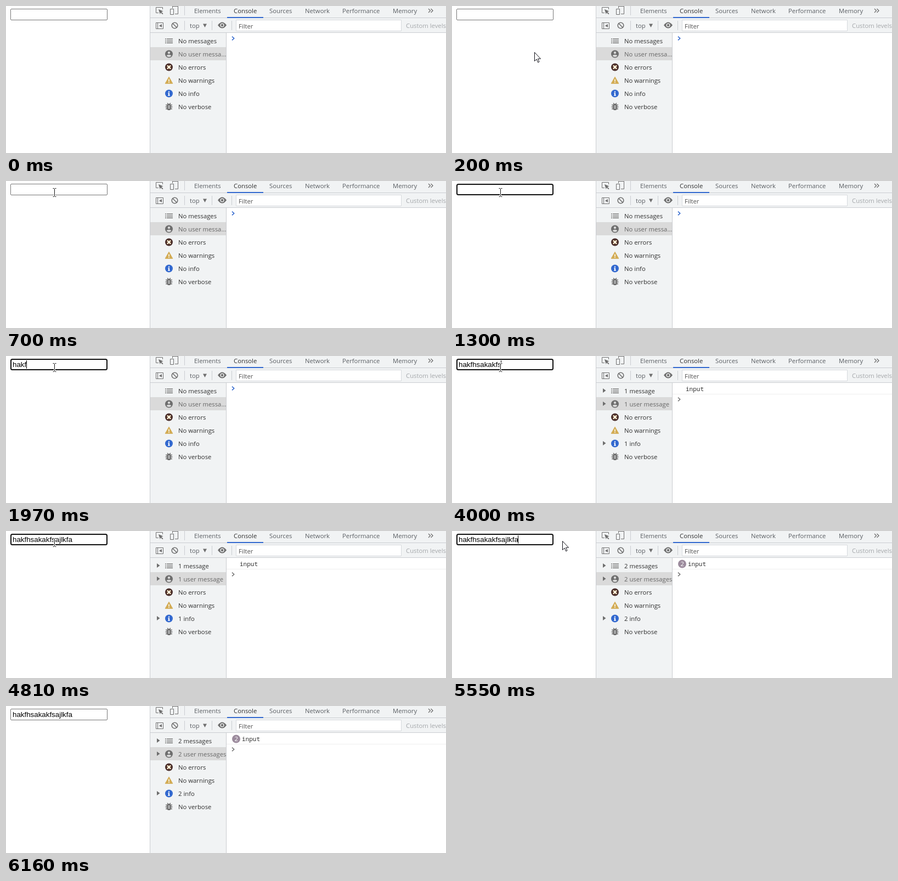
An HTML page with a canvas for the animation above (6230 ms loop, 802x268 px).

```html
<!DOCTYPE html>
<html lang="en">
<head>
<meta charset="utf-8">
<title>Debounced input</title>
<style>
  html, body { margin: 0; width: 100%; height: 100%; overflow: hidden; background: #fff; }
  canvas { display: block; }
</style>
</head>
<body>
<canvas id="stage" width="802" height="268"></canvas>
<script>
const ctx = document.getElementById('stage').getContext('2d');
const UI = '11.3px "Open Sans", "Noto Sans", sans-serif';
const MONO = '11px "Noto Sans Mono", "DejaVu Sans Mono", monospace';
const FIELD = '13.333px "Liberation Sans", Arial, sans-serif';
const BAR = '#f1f3f4', LINE = '#cacdd1', GREY = '#6e6e6e', INK = '#303030', BLUE = '#3369cf';

const LOOP = 6230, TICK = 66.6;
const FOCUS = 770, BLUR = 6160, BLINK = 495, WAIT = 990;
const BURSTS = [
  { keys: 'hakfhsak', start: 1700, end: 2180 },
  { keys: 'akfsajlkfa', start: 3810, end: 4280 }
];

const mix = (a, b, u) => a + (b - a) * u;
const easeOut = (u, power) => 1 - (1 - u) ** power;
const progress = (t, start, end) => Math.min(1, Math.max(0, (t - start) / (end - start)));

function typed(t) {
  return BURSTS.filter(b => t >= b.start).map(({ keys, start, end }) =>
    keys.slice(0, 1 + Math.floor(progress(t, start, end) * (keys.length - 1)))).join('');
}

// the blink restarts with each key
function caretOn(t) {
  let last = FOCUS;
  for (const b of BURSTS) if (t >= b.start) last = Math.min(t, b.end);
  return Math.floor((t - last) / BLINK) % 2 === 0;
}

// debounced: one message per pause in typing
const messages = t => BURSTS.filter(b => t >= b.end + WAIT).length;

function mouse(time) {
  const t = Math.floor(time / TICK) * TICK;
  if (t < 66 || t > 5850) return null;
  if (t < 5300) {
    const u = progress(t, 66, 630);
    return [mix(585, 88, easeOut(u, 7.7)), mix(258, 21, easeOut(u, 4.9))];
  }
  const u = progress(t, 5300, 5850);
  return [mix(88, 745, u * u), mix(21, 258, u * u) - 45 * Math.sin(Math.PI * u)];
}

function rect(x, y, w, h, color) {
  ctx.fillStyle = color;
  ctx.fillRect(x, y, w, h);
}

function label(str, x, y, color = INK, font = UI) {
  ctx.font = font;
  ctx.fillStyle = color;
  ctx.fillText(str, x, y);
  return ctx.measureText(str).width;
}

function disc(x, y, r, color) {
  ctx.fillStyle = color;
  ctx.beginPath();
  ctx.arc(x, y, r, 0, Math.PI * 2);
  ctx.fill();
}

function shape(d, x, y, fill, stroke, width = 1) {
  const path = new Path2D(d);
  ctx.save();
  ctx.translate(x, y);
  if (fill) { ctx.fillStyle = fill; ctx.fill(path); }
  if (stroke) { ctx.strokeStyle = stroke; ctx.lineWidth = width; ctx.stroke(path); }
  ctx.restore();
}

function frame(x, y, w, h, radius, width, color) {
  ctx.strokeStyle = color;
  ctx.lineWidth = width;
  ctx.beginPath();
  ctx.roundRect(x + width / 2, y + width / 2, w - width, h - width, radius);
  ctx.stroke();
}

function drawField(t) {
  const focus = t >= FOCUS && t < BLUR;
  frame(8, 5, 177, 21, focus ? 2.5 : 1.5, focus ? 2 : 1, focus ? '#101010' : '#767676');
  const width = label(typed(t), 12, 20, '#000', FIELD);
  if (focus && caretOn(t)) rect(12 + Math.floor(width), 8, 1, 15, '#000');
}

function drawTabs() {
  rect(263, 0, 539, 21, BAR);
  rect(263, 21, 539, 1, LINE);
  shape('M5 10.5H.5V.5H12.5V4', 273, 2, null, GREY);
  shape('M5 4L13.5 7.5L10.3 8.8L13.5 12L12.2 13.2L9 10L7.8 13Z', 273, 2, GREY);
  shape('M3.5 4V.5H13.5V14.5H8', 300, 0, null, GREY);
  shape('M.5 5.5H6.5V15.5H.5Z', 299, 0, BAR, GREY);
  rect(325, 0, 1, 17, LINE);
  let x = 343;
  for (const name of ['Elements', 'Console', 'Sources', 'Network', 'Performance', 'Memory']) {
    const active = name === 'Console';
    const left = Math.round(x);
    const width = label(name, left, 13, active ? INK : '#5a5e63');
    if (active) rect(left - 12, 20, Math.round(width) + 24, 2, BLUE);
    x += width + 23.2;
  }
  shape('M0 0L3.5 3.5L0 7M4.5 0L8 3.5L4.5 7', 770, 5, null, GREY, 1.3);
}

function drawToolbar() {
  rect(263, 22, 539, 26, BAR);
  rect(263, 48, 539, 1, LINE);
  shape('M.5 .5H13.5V11.5H.5ZM3.5 1V11', 273, 30, null, GREY);
  shape('M11 3V9L6 6Z', 273, 30, GREY);
  shape('M-5.3 0A5.3 5.3 0 1 1 5.3 0A5.3 5.3 0 1 1 -5.3 0M-3.7 -3.7L3.7 3.7', 307.5, 35.5, null, GREY, 1.6);
  for (const x of [325, 375, 411]) rect(x, 27, 1, 17, LINE);
  label('top', 335, 40, '#5a5e63');
  shape('M0 0H7L3.5 6.5Z', 359, 32.5, GREY);
  shape('M-8 0Q0 -11 8 0Q0 11 -8 0Z', 394, 35, GREY);
  disc(394, 35, 3.6, BAR);
  disc(394, 35, 2.2, GREY);
  rect(419, 25, 302, 21, '#fff');
  frame(419, 25, 302, 21, 0, 1, '#d6d9dc');
  label('Filter', 424, 41, '#505050');
  label('Custom levels', 729, 40, '#a5a8ab');
}

const ICONS = [
  y => {
    for (let i = -1; i < 2; i++) {
      const top = y - 0.5 + i * 3.5;
      rect(290, top, 2, 1.5, GREY);
      rect(293, top, 11, 1.5, GREY);
    }
  },
  y => {
    disc(297, y, 7, GREY);
    disc(297, y - 2.4, 2.2, '#dadada');
    shape('M-4.3 3.6Q-3.5 1.2 0 1.2Q3.5 1.2 4.3 3.6Q0 7.6 -4.3 3.6Z', 297, y, '#dadada');
  },
  y => {
    const cross = 'M-3 -3L3 3M3 -3L-3 3';
    disc(297, y, 7, '#4b302d');
    shape(cross, 297, y, null, '#d9b36c', 2.8);
    shape(cross, 297, y, null, '#fff', 1.7);
  },
  y => {
    shape('M0 -6.2L6.8 5.8H-6.8Z', 297, y, '#d3ac55', '#d3ac55');
    rect(296.2, y - 2, 1.6, 4, '#fff');
    rect(296.2, y + 3, 1.6, 1.6, '#fff');
  },
  y => {
    disc(297, y, 7, BLUE);
    rect(296, y - 4, 2, 2, '#fff');
    shape('M-2 -1H1V3H2V4.3H-2V3H-1V0H-2Z', 297, y, '#fff');
  },
  y => {
    shape('M-6 -3H6M-6.5 .5H6.5M-6 4H6M-3 -6.5L-1 -4.5M3 -6.5L1 -4.5', 297, y, null, GREY, 1.6);
    shape('M-4 -1Q-4 -5 0 -5Q4 -5 4 -1V2.5Q4 6.5 0 6.5Q-4 6.5 -4 2.5Z', 297, y, GREY);
    rect(295, y - 1.6, 4, 1.3, BAR);
    rect(295, y + 1.6, 4, 1.3, BAR);
  }
];

function drawSidebar(n) {
  rect(263, 49, 138, 219, BAR);
  rect(263, 75, 138, 24, '#dadada');
  const s = n === 1 ? '' : 's';
  const names = n
    ? [`${n} message${s}`, `${n} user message${s}`, 'No errors', 'No warnings', `${n} info`, 'No verbose']
    : ['No messages', 'No user messa...', 'No errors', 'No warnings', 'No info', 'No verbose'];
  ctx.save();
  ctx.beginPath();
  ctx.rect(263, 49, 138, 219);
  ctx.clip();
  names.forEach((name, i) => {
    const y = 63 + i * 24;
    ICONS[i](y + 0.5);
    label(name, 314, y + 5, i === 1 ? '#666' : INK);
    if (!name.startsWith('No')) shape('M0 -4L5.5 0L0 4Z', 275, y, GREY);
  });
  ctx.restore();
  rect(401, 49, 1, 219, LINE);
}

function drawConsole(n) {
  if (n) {
    rect(402, 69, 400, 1, '#efefef');
    label('input', n > 1 ? 430 : 426, 64, INK, MONO);
  }
  if (n > 1) {
    disc(419.5, 60, 7.5, '#9c8b9d');
    label('2', 416.5, 64, '#fff');
  }
  shape('M0 -3.3L3.7 0L0 3.3', 412, n ? 79 : 59, null, n ? '#777' : BLUE, 1.6);
}

function drawMouse(pos) {
  if (!pos) return;
  const [x, y] = pos.map(Math.round);
  if (x > 8 && x < 185 && y > 5 && y < 26) {
    const beam = 'M-3 -7.5H-1L0 -6.5L1 -7.5H3M0 -6.5V6.5M-3 7.5H-1L0 6.5L1 7.5H3';
    shape(beam, x + 0.5, y, null, '#fff', 3);
    shape(beam, x + 0.5, y, null, '#111');
  } else {
    shape('M.5 .5V16.5L4.2 13L6.6 18.8L9 17.8L6.6 12.2H11.5Z', x, y, '#fff', '#101018');
  }
}

function draw() {
  const t = performance.now() % LOOP;
  const n = messages(t);
  rect(0, 0, 802, 268, '#fff');
  drawField(t);
  rect(262, 0, 1, 268, LINE);
  drawToolbar();
  drawTabs();
  drawSidebar(n);
  drawConsole(n);
  drawMouse(mouse(t));
  requestAnimationFrame(draw);
}
draw();
</script>
</body>
</html>
```
